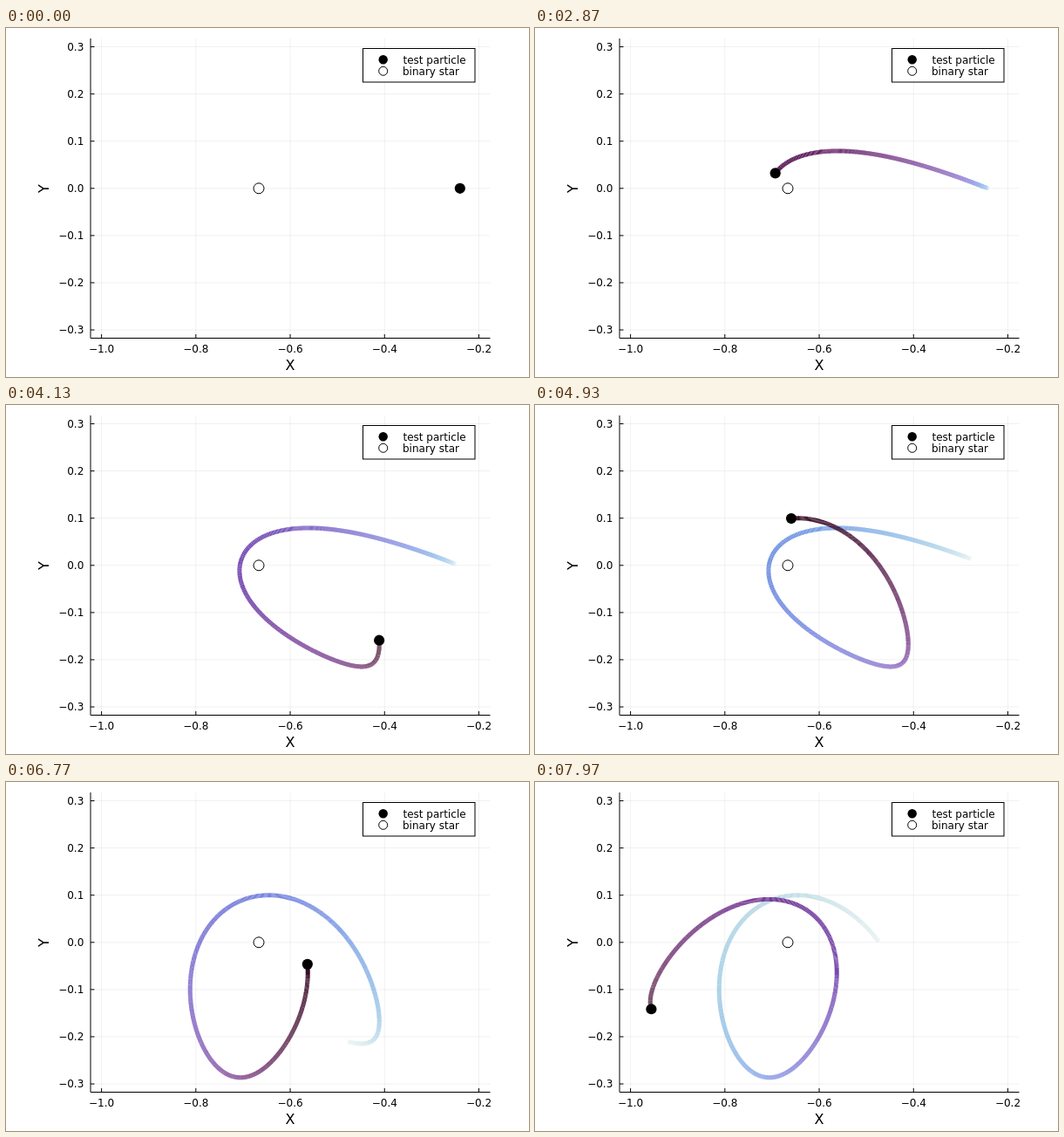
These frames come from a looping animation (600 by 400 pixels, 8 s). An HTML page with a canvas:

```html
<!DOCTYPE html>
<html lang="en">
<head>
<meta charset="utf-8">
<title>Test particle in a binary system</title>
<style>
  html, body { margin: 0; width: 100%; height: 100%; overflow: hidden; background: #fff; }
  canvas, svg { position: absolute; left: 0; top: 0; width: 600px; height: 400px; }
  text { font: 12px "DejaVu Sans", sans-serif; }
  .label { font-size: 16px; text-anchor: middle; }
  .line { fill: none; stroke: #000; }
  .hollow { fill: #fff; stroke: #000; }
</style>
</head>
<body>
<canvas id="stage" width="600" height="400"></canvas>
<svg id="chart" viewBox="0 0 600 400">
  <path class="line" d="M97 12V355.5H555.5"/>
  <g id="ticks"></g>
  <text class="label" x="326" y="392">X</text>
  <text class="label" transform="translate(48.5 184) rotate(-90)">Y</text>
  <circle class="hollow" cx="290" cy="183.8" r="6"/>
  <rect class="hollow" x="409.5" y="23.5" width="128.5" height="38.5"/>
  <circle cx="432.7" cy="36.3" r="5.2"/>
  <circle class="hollow" cx="432.7" cy="49.3" r="5"/>
  <text x="455.5" y="40.6">test particle</text>
  <text x="455" y="53.6">binary star</text>
</svg>
<script>
const LOOP = 8000, FRAMES = 240;
const STEP = 0.001, STEPS_PER_FRAME = 15, TRAIL = 1500;
const M1 = 1 / 3, M2 = 2 / 3;   // star masses, at x = -M2 and x = M1
const toX = x => 109.6 + 541.1 * (x + 1);
const toY = y => 183.8 - 540.8 * y;
const ctx = document.getElementById('stage').getContext('2d');

const xTicks = [-1, -0.8, -0.6, -0.4, -0.2];
const yTicks = [-0.3, -0.2, -0.1, 0, 0.1, 0.2, 0.3];

function drawTicks() {
  const name = v => v.toFixed(1).replace('-', '\u2212');
  const mark = (d, x, y, anchor, v) =>
    `<path class="line" d="${d}"/><text x="${x}" y="${y}" text-anchor="${anchor}">${name(v)}</text>`;
  document.getElementById('ticks').innerHTML =
    xTicks.map(v => mark(`M${toX(v)} 355.5v-4.5`, toX(v), 371.5, 'middle', v)).join('') +
    yTicks.map(v => mark(`M97 ${toY(v)}h4.5`, 89.3, toY(v) + 4.4, 'end', v)).join('');
}

// Restricted three-body problem in the co-rotating frame.
function derive([x, y, u, v]) {
  const a = M1 / Math.hypot(x + M2, y) ** 3;
  const b = M2 / Math.hypot(x - M1, y) ** 3;
  return [u, v,
    x + 2 * v - a * (x + M2) - b * (x - M1),
    y - 2 * u - (a + b) * y];
}

function advance(s) {
  const shift = (k, h) => s.map((q, i) => q + h * k[i]);
  const k1 = derive(s);
  const k2 = derive(shift(k1, STEP / 2));
  const k3 = derive(shift(k2, STEP / 2));
  const k4 = derive(shift(k3, STEP));
  return s.map((q, i) => q + STEP / 6 * (k1[i] + 2 * k2[i] + 2 * k3[i] + k4[i]));
}

function buildOrbit() {
  const points = [];
  let state = [-0.24, 0, -0.01, 0];
  for (let i = 0; i <= FRAMES * STEPS_PER_FRAME; i++) {
    points.push([toX(state[0]), toY(state[1])]);
    state = advance(state);
  }
  return points;
}

const stops = ['e6f0f0', 'bfdde5', '9cc9e2', '81b4e3', '739ae4', '757fdd',
  '7864ca', '774aaf', '71328d', '641f68', '501442', '360e24']
  .map(hex => [0, 2, 4].map(i => parseInt(hex.slice(i, i + 2), 16)));

function colorAt(p) {
  const q = p * (stops.length - 1);
  const i = Math.min(Math.floor(q), stops.length - 2);
  const mix = stops[i].map((c, k) => Math.round(c + (stops[i + 1][k] - c) * (q - i)));
  return `rgb(${mix})`;
}

const orbit = buildOrbit();
const palette = Array.from({ length: TRAIL }, (_, i) => colorAt(i / (TRAIL - 1)));

function line(x1, y1, x2, y2) {
  ctx.beginPath();
  ctx.moveTo(x1, y1);
  ctx.lineTo(x2, y2);
  ctx.stroke();
}

function draw(frame) {
  const head = frame * STEPS_PER_FRAME;
  const tail = Math.max(0, head - TRAIL);
  ctx.fillStyle = '#fff';
  ctx.fillRect(0, 0, 600, 400);

  ctx.lineWidth = 1;
  ctx.strokeStyle = 'rgba(0,0,0,.06)';
  xTicks.forEach(v => line(toX(v), 12, toX(v), 355.5));
  yTicks.forEach(v => line(97, toY(v), 555.5, toY(v)));

  // Separate short strokes: their soft ends make slow stretches paler.
  ctx.lineWidth = 5;
  for (let i = tail; i < head; i++) {
    ctx.strokeStyle = palette[i - tail];
    line(...orbit[i], ...orbit[i + 1]);
  }

  ctx.fillStyle = '#000';
  ctx.beginPath();
  ctx.arc(...orbit[head], 6.1, 0, 2 * Math.PI);
  ctx.fill();
}

let shown = -1;
const start = performance.now();

function tick() {
  const time = (performance.now() - start) % LOOP;
  // 30 frames a second, with starts rounded to hundredths of a second
  const frame = Math.min(FRAMES - 1, Math.floor((Math.floor(time / 10) + 0.5) * 0.3));
  if (frame !== shown) draw(shown = frame);
  requestAnimationFrame(tick);
}

drawTicks();
tick();
</script>
</body>
</html>
```
